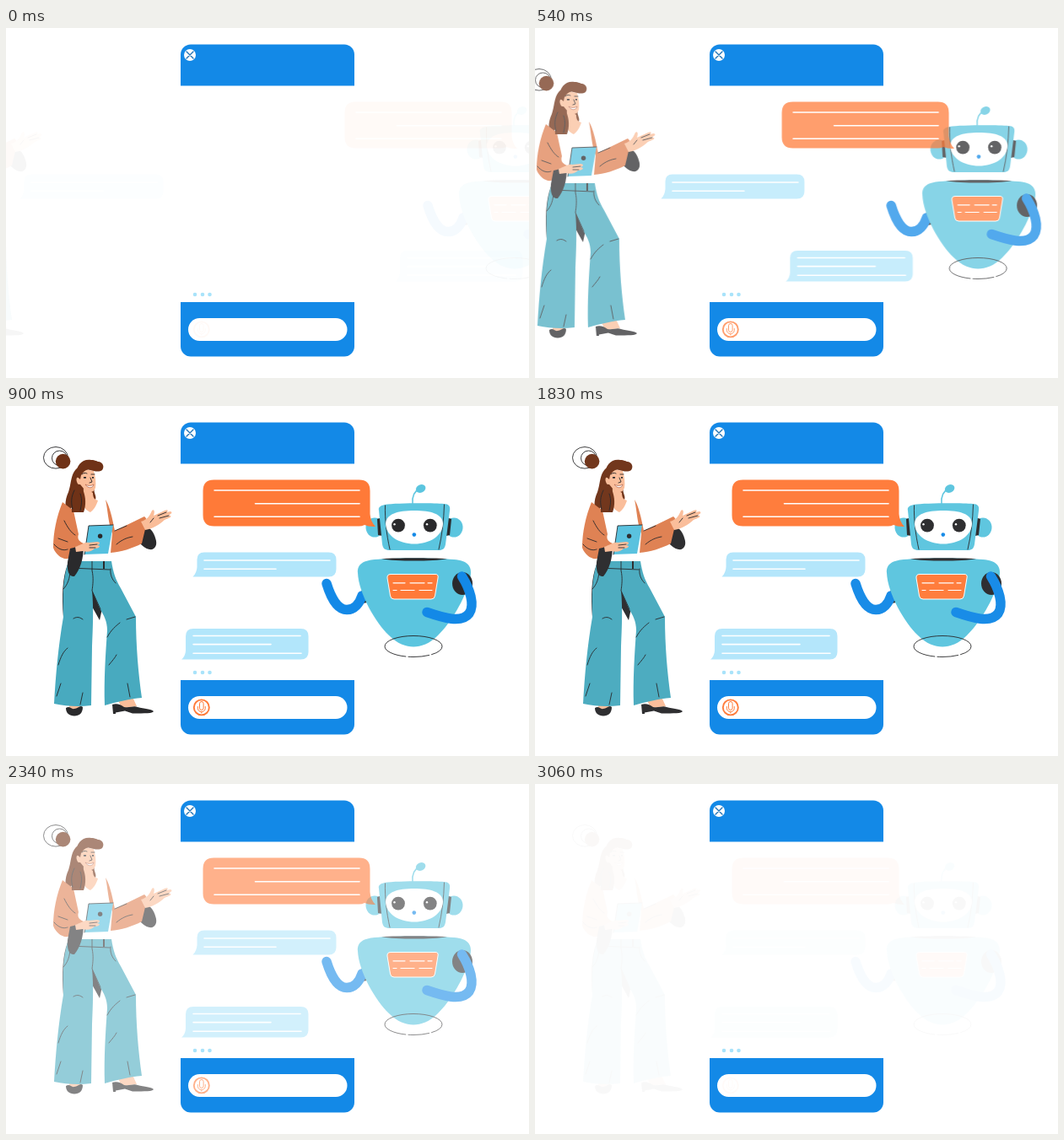
These frames come from a looping animation (620 by 415 pixels, 3.18 s). An HTML page without scripts:

```html
<!DOCTYPE html>
<html lang="en">
<head>
<meta charset="utf-8">
<title>Chat assistant</title>
<style>
  html, body { margin: 0; width: 100%; height: 100%; overflow: hidden; background: #fff; }
  svg { display: block; width: 100%; height: 100%; }

  .actor { animation: fade 3180ms linear infinite, slide 3180ms linear infinite; }
  @keyframes slide {
    0% { transform: translateX(var(--dx, 0px)); animation-timing-function: cubic-bezier(.37, 0, .63, 1); }
    28.6%, 100% { transform: none; }
  }
  @keyframes fade {
    0%, 2.6% { opacity: .04; }
    2.84% { opacity: .12; }
    9.43% { opacity: .47; }
    17% { opacity: .73; }
    28.3%, 56.6% { opacity: 1; }
    96.2%, 100% { opacity: .03; }
  }

  .blue { fill: #1389e7; }
  .aqua { fill: #5bc5df; }
  .orange { fill: #ff7a38; }
  .pale { fill: #b2e6fb; }
  .dark { fill: #2a2a2c; }
  .white { fill: #fff; }
  .skin { fill: #fabd99; }
  .hair { fill: #6f3217; }
  .coat { fill: #df7f50; }
  .jeans { fill: #48aabf; }
  .ink { fill: none; stroke: #242426; stroke-width: .9; stroke-linecap: round; stroke-linejoin: round; }
  .rule { fill: none; stroke: #fff; stroke-width: 1.6; stroke-linecap: round; }
  .arm { fill: none; stroke: #1389e7; stroke-width: 11.5; stroke-linecap: round; }
</style>
</head>
<body>
<svg viewBox="0 0 620 415">
  <!-- phone -->
  <rect class="blue" x="207" y="19.5" width="206" height="370" rx="12"/>
  <rect class="white" x="206" y="68.5" width="208" height="256.5"/>
  <circle class="white" cx="218" cy="32" r="7"/>
  <path d="M214 28l8 8m0-8l-8 8" fill="none" stroke="#2273b5" stroke-width="1.4" stroke-linecap="round"/>
  <rect class="white" x="216" y="344" width="188.5" height="27" rx="13.5"/>
  <g fill="#a9e3fa">
    <circle cx="224" cy="316" r="2.3"/>
    <circle cx="233" cy="316" r="2.3"/>
    <circle cx="241.5" cy="316" r="2.3"/>
  </g>

  <!-- microphone -->
  <g class="actor" fill="none" stroke="#ff7a38" stroke-linecap="round">
    <circle cx="231.8" cy="357.4" r="9" stroke-width="1.9"/>
    <rect x="229.5" y="350.5" width="4.6" height="10" rx="2.3" stroke-width="1"/>
    <path d="M227.3 356.5v1.7a4.5 4.5 0 0 0 9 0v-1.7M231.8 362.7v1.3" stroke-width="1"/>
  </g>

  <!-- woman -->
  <g class="actor" style="--dx:-154px">
    <ellipse class="ink" cx="59" cy="61.3" rx="14.5" ry="12.8"/>
    <ellipse class="ink" cx="63.5" cy="61.8" rx="9" ry="8.8"/>
    <circle class="hair" cx="67.6" cy="65.6" r="8.8"/>

    <!-- shoes and ankles -->
    <path class="skin" d="M75 351h14v8H75zM132 347l18-2 5 11-18 2z"/>
    <path class="dark" d="M71 358C76 355 77 360 81 359C85 359 88 354 91 357C91 364 87 367.5 81 367.5S71 364 71 358z"/>
    <path class="dark" d="M126 354C131 352 136 354 140 357C148 358 151 355 156 357C164 359 172 359 175 362C174 364.500 165 364.500 150 364.500L141 361.500L130 363.500V365H127z"/>

    <!-- trousers -->
    <path class="dark" d="M73 188C67 203 66 225 68 250L75 210zM102 208L114 240L111 254L101 236z"/>
    <path class="jeans" d="M75 181L125 184C127 197 130 206 136 216L154 250C154 285 157 318 161 346C147 347 131 351 117 355C116 325 118 294 120 266C120 255 116 248 111 240L102 219C104 240 103 262 102 285L101 355C86 357 71 356 57 353C59 318 62 285 68 250C68 226 66 208 75 181z"/>
    <path class="ink" d="M74 192L123 194M102 184V195C104 204 103 212 102 219L112 241M76 194C76 204 73 212 68 217M124 193C123 200 126 206 130 210M80 252C85 249 88 251 91 253M62 307C65 297 68 291 73 287M88 354L91 340M120 274C125 265 130 261 135 257M122 307C126 302 129 299 131 295M147 345L144 329M153 250L143 253M60 344L65 329"/>
    <path class="dark" d="M115 184h2v9h-2zM83 183h2v8h-2z"/>

    <!-- torso and hair -->
    <path class="hair" d="M87 72C76 78 78 91 74 102C69 113 70 122 73 127C81 129 89 128 93 126L106 111C108 107 103 102 105 98L102 78z"/>
    <path class="white" d="M77 121L95 113L106 112L121 117L127 143L124 184H90L84 152z"/>
    <path class="skin" d="M92 96L103 103C103 109 105 111 109 112C107 119 103 124 100 126C96 124 92 121 91 115z"/>

    <!-- sleeves -->
    <path class="coat" d="M67 114L80 124L86 152C84 158 87 161 94 164L91 172C85 173 79 176 76 180C69 184 59 177 56 168C56 150 60 131 67 114z"/>
    <path class="dark" d="M76 169C82 168 87 165 92 165C92 181 88 194 81 202C75 203 72 196 73 185z"/>
    <path class="dark" d="M164 146C171 141 176 151 178 160C179 166 176 171 170 170C165 169 162 166 159 163z"/>
    <path class="coat" d="M118 111C123 119 126 133 129 148L164 131C168 134 168 139 165 146L161 163C150 169 136 173 124 174L126 151C121 139 121 125 118 111z"/>
    <path class="ink" d="M129 148L143 142M131 164C138 158 144 156 150 155M57 164C62 170 68 172 73 170M69 136C73 144 77 150 82 153M62 157L73 161"/>

    <!-- open hand -->
    <path class="skin" d="M160 137C167 135 170 131 173 124C175 122 177 124 175 130L188 124C192 122 193 124 190 126L195 125C198 126 196 128 192 130L195 130C197 132 192 133 188 135C181 141 175 145 165 147z"/>
    <path class="ink" stroke-width=".5" d="M180 130L190 126M182 133L193 130M171 138l4-5"/>

    <!-- tablet -->
    <path d="M98 142L127 141L121 175L93 176z" fill="#56c1df"/>
    <path class="ink" d="M93 176L98 142L127 141" stroke-width="1.2"/>
    <circle class="dark" cx="111.600" cy="154.200" r="2.700"/>
    <path class="skin" d="M82 167C89 165 93 161 98 162L108 161C112 161 112 164 108 165L111 166C111 168 108 169 105 169C102 172 97 174 91 172L83 173z"/>
    <path class="ink" d="M99 165l9-1M99 168l7 0" stroke-width=".5"/>

    <!-- head -->
    <path class="skin" d="M87 74L104 77C106 84 107 91 106 97C104 103 98 104 93 99L88 93C82 94 81 85 86 84z"/>
    <path class="hair" d="M83 82C83 70 91 62 101 64C106 64 108 66 110 66C115 67 117 72 114 76C110 79 104 77 100 76C95 74 92 78 89 82L88 87C85 84 83 84 83 82z"/>
    <path class="hair" d="M84 84C82 90 86 94 91 99C95 108 95 118 92 126L78 126L77 97z"/>
    <path class="ink" d="M90 81C92 79 94 79 96 80M101 81l4 0M100 85l2 5-3 1" stroke-width=".8"/>
    <path class="dark" d="M92 84h3v1.800h-3zM102 84h2v1.800h-2z"/>
    <path d="M94 93C98 95 101 95 104 93C103 98 97 98 94 93z" fill="#fff" stroke="#a34a32" stroke-width=".6"/>
    <path class="ink" d="M81 100C77 108 77 115 79 122M88 104C91 112 89 118 88 124" stroke-width=".6"/>
  </g>

  <!-- robot -->
  <g class="actor" style="--dx:120px">
    <path class="ink" d="M482 116C481 106 484 101 490 98" style="stroke:#5bc5df;stroke-width:1.500"/>
    <ellipse class="aqua" cx="491.600" cy="98" rx="6" ry="4.600" transform="rotate(-25 491.600 98)"/>
    <ellipse class="aqua" cx="437" cy="144" rx="10.500" ry="11.500"/>
    <ellipse class="aqua" cx="531" cy="144" rx="10.500" ry="11.500"/>
    <path class="dark" d="M440 134L446 132V154L441 153zM528 134L522 132V154L526 153z"/>
    <path class="aqua" d="M449 117C462 115 506 115 519 116C525 116 527 119 526 124L521 164C520 169 518 171 513 171H455C449 171 447 169 446 164L442 124C441 120 444 118 449 117z"/>
    <path class="ink" d="M449.500 118C449 134 451 152 455 170M519.500 117C519 135 517 153 513 170"/>
    <path class="white" d="M484 124C504 124 517 128 518 139C518 154 502 163.500 484 163.500S450 154 450 139C451 128 464 124 484 124z"/>
    <g class="dark"><circle cx="465" cy="141.600" r="7.900"/><circle cx="502.800" cy="141.600" r="7.900"/></g>
    <g class="white"><circle cx="460.500" cy="140.300" r="1.200"/><circle cx="499" cy="140.300" r="1.200"/></g>
    <circle class="blue" cx="483.800" cy="152.600" r="2.300"/>

    <path class="dark" d="M425 216C420 219 417 226 418 235L428 233z"/>
    <path class="arm" d="M380 210.500C385 227 393 241.500 404 241.500C413 241.500 419 234 422 225"/>
    <path class="aqua" d="M437 182C460 180 506 180 531 182C547 183 554 190 550 205C545 228 526 259 512 272C502 282 492 285.500 483 285.500S464 282 454 272C438 257 418 222 417 198C416 187 425 183 437 182z"/>
    <path class="dark" d="M445 181.200C465 180 503 180 523 181.200C505 184.400 463 184.400 445 181.200z"/>
    <path class="orange" d="M456 199.500H509Q513 199.500 512 204L508.500 225Q508 229 504 229H460Q456 229 455.500 225L452 204Q451.500 199.500 456 199.500z" stroke="#fff" stroke-width="1"/>
    <path class="rule" d="M459 209.800h14m6 0h17m4 0h5M459 218.500h4m5 0h16m6 0h15" style="stroke-width:1.200"/>
    <ellipse class="ink" cx="483" cy="285" rx="34" ry="12.500" pathLength="100" stroke-dasharray="11 2 16 2 69 0"/>
    <ellipse class="dark" cx="541" cy="210.500" rx="12" ry="13.500"/>
    <path class="arm" d="M540.500 202C550 217 556 236 549 246C540 258 518 251 499 244.500"/>
  </g>

  <!-- speech bubbles -->
  <g class="actor" style="--dx:168px">
    <path class="orange" d="M246.500 87.500H418.500Q431.500 87.500 431.500 100.500V128Q432 137 438 143Q430 143.500 425 141Q422 142.500 418.500 142.500H246.500Q233.500 142.500 233.500 129.500V100.500Q233.500 87.500 246.500 87.500z"/>
    <path class="rule" d="M247 100h172M295.500 115.700h123.500M247 131.300h172"/>
  </g>
  <g class="actor" style="--dx:-205px">
    <path class="pale" d="M235 173.500H382.500Q391.500 173.500 391.500 182.500V193.500Q391.500 202.500 382.500 202.500H221.500Q226 198 226.500 191V182Q226.500 173.500 235 173.500z"/>
    <path class="rule" d="M235 183h149M235 193.300h85"/>
  </g>
  <g class="actor" style="--dx:254px">
    <path class="pale" d="M222 264H349.500Q358.500 264 358.500 273V291.500Q358.500 300.500 349.500 300.500H208Q212.500 297 213 290V273Q213 264 222 264z"/>
    <path class="rule" d="M222 272.500h127M222 282.600h92M222 293.200h128"/>
  </g>
</svg>
</body>
</html>
```
